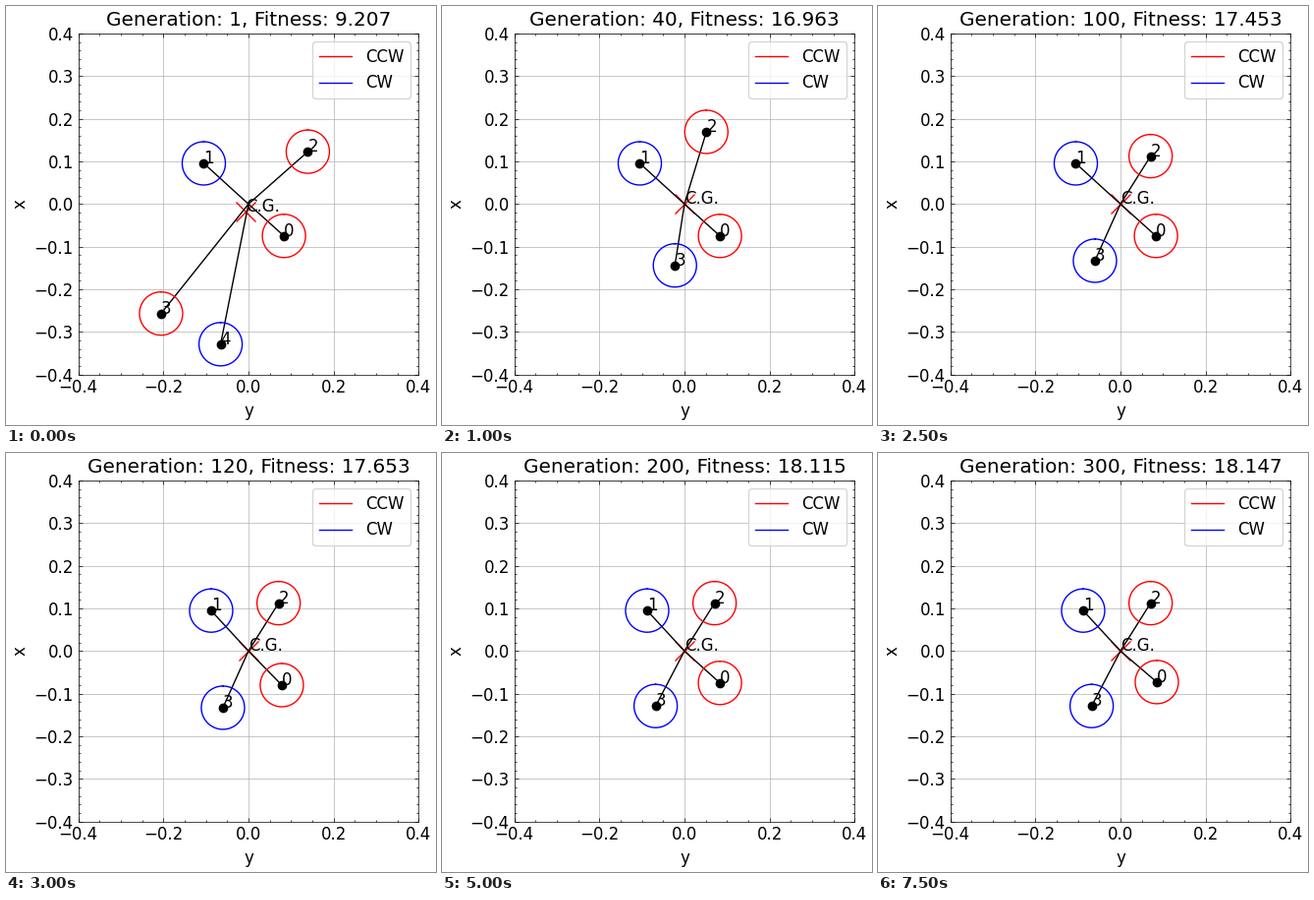
A matplotlib script for the animation above (8000 ms loop, 438x426 px).

```python
import numpy as np
import matplotlib.pyplot as plt
from matplotlib.animation import FuncAnimation
from matplotlib.ticker import MultipleLocator

W, H, DPI = 438, 426, 100
LEFT, TOP, SIDE = 73.7, 28.1, 346.5
STEPS, INTERVAL = 16, 500
RADIUS = 0.0508      # propeller radius in metres
MASS_SHARE = 0.042   # share of one motor in the total mass

plt.rcParams.update({
    "font.family": "DejaVu Sans",
    "font.size": 12,
    "axes.linewidth": 0.5,
    "axes.axisbelow": True,
    "grid.linewidth": 0.5,
    "lines.linewidth": 1.0,
})

FITNESS = [9.207, 16.482, 16.963, 17.168, 17.168, 17.453, 17.653, 17.896,
           18.112, 18.113, 18.115, 18.131, 18.133, 18.145, 18.145, 18.147]

# Per rotor: {first step: (y, x, colour)}; None removes the rotor.
ROTORS = [
    {0: (0.0835, -0.0748, "r"), 6: (0.0785, -0.0800, "r"),
     7: (0.0835, -0.0748, "r"), 11: (0.0852, -0.0732, "r"),
     13: (0.0855, -0.0728, "r")},
    {0: (-0.1050, 0.0955, "b"), 3: (-0.1240, 0.0680, "b"),
     5: (-0.1050, 0.0955, "b"), 6: (-0.0877, 0.0950, "b")},
    {0: (0.1397, 0.1230, "r"), 1: (0.1080, 0.1400, "r"),
     2: (0.0515, 0.1695, "r"), 3: (0.1080, 0.1400, "r"),
     5: (0.0709, 0.1125, "r")},
    {0: (-0.2055, -0.2570, "r"), 1: (-0.1097, -0.1370, "b"),
     2: (-0.0224, -0.1440, "b"), 3: (-0.0600, -0.1330, "b"),
     8: (-0.0677, -0.1290, "b")},
    {0: (-0.0655, -0.3290, "b"), 1: None},
]

fig = plt.figure(figsize=((W + 1e-6) / DPI, (H + 1e-6) / DPI), dpi=DPI,
                 facecolor="white")
ax = fig.add_axes([LEFT / W, (H - TOP - SIDE) / H, SIDE / W, SIDE / H])
ax.set(xlim=(-0.4, 0.4), ylim=(-0.4, 0.4), xlabel="y", ylabel="x")
ax.xaxis.set_major_locator(MultipleLocator(0.2))
ax.xaxis.set_minor_locator(MultipleLocator(0.05))
ax.yaxis.set_major_locator(MultipleLocator(0.1))
ax.yaxis.set_minor_locator(MultipleLocator(0.02))
ax.tick_params(which="both", direction="in", top=True, right=True, width=0.5)
ax.tick_params(which="major", length=3)
ax.tick_params(which="minor", length=1.5)
ax.grid(True)

title = ax.set_title("")
cg_mark, = ax.plot([], [], "rx", ms=14, mew=1, zorder=1)
cg_text = ax.text(0, 0, "C.G.")

angle = np.linspace(0, 2 * np.pi, 100)
RING_Y, RING_X = RADIUS * np.sin(angle), RADIUS * np.cos(angle)


class Rotor:
    def __init__(self, index):
        self.track = ROTORS[index]
        self.arm, = ax.plot([], [], "k-")
        self.ring, = ax.plot([], [])
        self.hub, = ax.plot([], [], "ko")
        self.label = ax.text(0, 0, str(index))
        self.artists = [self.arm, self.ring, self.hub, self.label]

    def state(self, step):
        return self.track[max(k for k in self.track if k <= step)]

    def update(self, step):
        state = self.state(step)
        for artist in self.artists:
            artist.set_visible(state is not None)
        if state is None:
            return 0.0, 0.0
        y, x, color = state
        self.arm.set_data([0, y], [0, x])
        self.ring.set_data(y + RING_Y, x + RING_X)
        self.ring.set_color(color)
        self.hub.set_data([y], [x])
        self.label.set_position((y, x))
        return y, x


rotors = [Rotor(i) for i in range(len(ROTORS))]
keys = [plt.Line2D([], [], color=c) for c in "rb"]
ax.legend(keys, ["CCW", "CW"], loc="upper right")


def update(step):
    cg = MASS_SHARE * np.sum([r.update(step) for r in rotors], axis=0)
    cg_mark.set_data([cg[0]], [cg[1]])
    cg_text.set_position(cg)
    title.set_text(f"Generation: {max(1, 20 * step)}, "
                   f"Fitness: {FITNESS[step]:.3f}")
    return []


anim = FuncAnimation(fig, update, frames=STEPS, interval=INTERVAL,
                     repeat=True, repeat_delay=0, blit=False)
plt.show()
```
